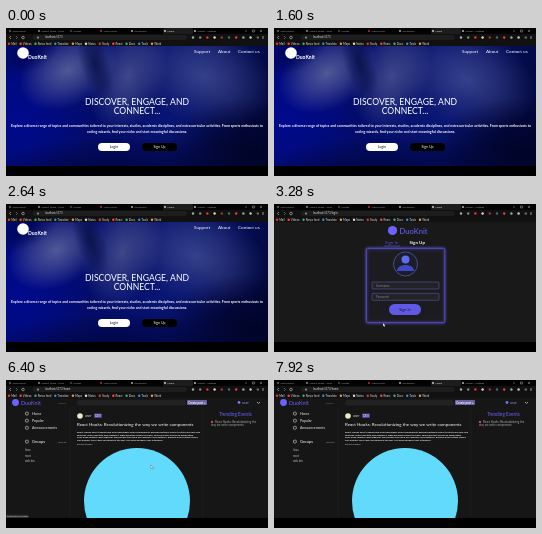
An HTML page with a canvas for the animation above (8 s loop, 262 by 148 pixels).

```html
<!DOCTYPE html>
<html lang="en">
<head>
<meta charset="utf-8">
<title>Community app tour</title>
<style>
html, body { margin: 0; width: 100%; height: 100%; overflow: hidden; background: #000; }
canvas { display: block; width: 262px; height: 148px; }
</style>
</head>
<body>
<canvas id="stage" width="262" height="148"></canvas>
<script>
const c = document.getElementById('stage').getContext('2d');
const LOOP = 8000, LOGIN = 3120, FILL = 3920, FEED = 5200;
const BRAND = 'DuoKnit', VIOLET = '#6c63ff';

function paint(fill, stroke, line) {
  if (fill) { c.fillStyle = fill; c.fill(); }
  if (stroke) { c.strokeStyle = stroke; c.lineWidth = line; c.stroke(); }
}
function box(x, y, w, h, fill, r = 0, stroke, line = .5) {
  c.beginPath();
  c.roundRect(x, y, w, h, r);
  paint(fill, stroke, line);
}
function dot(x, y, r, fill, stroke, line = .5) {
  c.beginPath();
  c.arc(x, y, r, 0, 7);
  paint(fill, stroke, line);
}
function line(color, width, ...pts) {
  c.beginPath();
  for (let i = 0; i < pts.length; i += 2) c.lineTo(pts[i], pts[i + 1]);
  paint(null, color, width);
}
function text(s, x, y, size, fill = '#fff', weight = 400, align = 'left') {
  c.font = `${weight} ${size}px Lato, sans-serif`;
  c.textAlign = align;
  c.fillStyle = fill;
  c.fillText(s, x, y);
}
// soft, optionally tilted ellipse
function glow(x, y, rx, ry, rgb, alpha, tilt = 0) {
  c.save();
  c.translate(x, y);
  c.rotate(tilt);
  c.scale(rx, ry);
  const g = c.createRadialGradient(0, 0, 0, 0, 0, 1);
  g.addColorStop(0, `rgba(${rgb},${alpha})`);
  g.addColorStop(.5, `rgba(${rgb},${alpha * .55})`);
  g.addColorStop(1, `rgba(${rgb},0)`);
  c.fillStyle = g;
  c.fillRect(-1, -1, 2, 2);
  c.restore();
}
function clip(x, y, w, h, paintInside) {
  c.save();
  c.beginPath();
  c.rect(x, y, w, h);
  c.clip();
  paintInside();
  c.restore();
}

function chrome(t) {
  box(0, 0, 262, 6, '#030303');
  box(157, 0, 30, 6, '#1d1d1d', 1.5);
  const tabs = ['Web project', 'Project board - tasks', 'Design', 'Video player', 'Dashboard', 'Home', 'Deploy - settings'];
  [4, 33, 65, 95, 126, 159, 189].forEach((x, i) => {
    dot(x, 3, .9, ['#777', '#999', '#456', '#d33', '#bbb', '#ddd', '#ccc'][i]);
    text(tabs[i], x + 2.5, 3.8, 2.5, i === 5 ? '#eee' : '#999');
  });
  line('#ccc', .4, 239, 3, 241, 3);
  box(246.5, 2, 2, 2, null, 0, '#ccc', .4);
  line('#ccc', .4, 254, 2, 256, 4);
  line('#ccc', .4, 256, 2, 254, 4);

  box(0, 6, 262, 12, '#111');
  line('#ccc', .6, 5, 8, 3.5, 9.5, 5, 11);
  line('#888', .6, 10, 8, 11.5, 9.5, 10, 11);
  dot(17, 9.5, 1.3, null, '#ccc', .6);
  box(27, 7, 154, 5, '#1d1d1d', 2.5);
  dot(32, 9.5, 1, '#999');
  const path = t < LOGIN ? '' : t < FEED ? '/login' : '/home';
  text('localhost:5173' + path, 39, 10.4, 2.7, '#ddd');
  ['#aaa', '#888', '#e33', '#ddd', '#a33', '#468', '#d44', '#9a9', '#ccc', '#666'].forEach((k, i) =>
    dot(187 + i * 7.2, 9.5, 1.2, k));
  line('#ccc', .7, 257, 8, 257, 11);

  const marks = ['Mail', 'Videos', 'News feed', 'Translate', 'Maps', 'Notes', 'Study', 'React', 'Docs', 'Tools', 'Work'];
  let x = 2;
  marks.forEach((s, i) => {
    dot(x + 1, 15.7, 1.2, ['#e33', '#f44', '#4a8', '#48d', '#e94', '#ddd'][i % 6]);
    text(s, x + 3.2, 16.7, 2.9, '#ddd');
    x += c.measureText(s).width + 6.2;
  });
  box(0, 138, 262, 10, '#000');
}

function backdrop(t) {
  const p = t / LOGIN, sway = Math.sin(p * Math.PI / 2);
  const g = c.createLinearGradient(0, 40, 262, 120);
  ['#000a78', '#030c6a', '#050f66', '#030839'].forEach((k, i) => g.addColorStop(i / 3, k));
  c.fillStyle = g;
  c.fillRect(0, 18, 262, 120);
  glow(12, 92, 75, 62, '0,10,150', .75);
  glow(198 - 8 * sway, 48 + 4 * sway, 72, 50, '85,98,165', .6, .35);
  glow(122 - 6 * sway, 48, 38, 58, '100,110,160', .6, .3);
  glow(62 - 12 * sway, 42 + 4 * sway, 52, 36, '110,118,165', .72, -.5);
  glow(89 - 5 * sway, 36, 15, 40, '2,8,60', .7, -.3);
  glow(22 - 4 * sway, 24, 36, 20, '0,4,70', .65, -.4);
  glow(165 - 8 * sway, 92, 75, 32, '15,32,135', .4);
  glow(245, 125, 90, 55, '0,2,35', .8);
  glow(110, 146, 130, 38, '0,2,50', .7);
}

function landing(t) {
  clip(0, 18, 262, 120, () => backdrop(t));
  dot(17, 25, 5.8, '#fff');
  text(BRAND, 22, 30.8, 5, '#fff', 700);
  text('Support', 188, 25, 4.6);
  text('About', 212, 25, 4.6);
  text('Contact us', 232, 25, 4.6);
  text('DISCOVER, ENGAGE, AND', 131, 76.5, 8.6, '#fff', 400, 'center');
  text('CONNECT...', 131, 86, 8.6, '#fff', 400, 'center');
  text('Explore a diverse range of topics and communities tailored to your interests, studies, academic disciplines, and extracurricular activities. From sports enthusiasts to',
    131, 99.3, 3.5, '#fff', 700, 'center');
  text('coding wizards, find your niche and start meaningful discussions.', 131, 104.8, 3.5, '#fff', 700, 'center');
  box(92, 115, 32, 8, '#fff', 4);
  text('Login', 108, 120.2, 3.5, '#111', 400, 'center');
  box(136, 115, 35, 8, '#000', 4);
  text('Sign Up', 153.5, 120.2, 3.5, '#fff', 400, 'center');
}

function login(t) {
  box(0, 18, 262, 120, '#191919');
  dot(118.5, 26.5, 4.6, VIOLET);
  text(BRAND, 125.5, 29.5, 7.6, VIOLET);
  text('Sign In', 111, 40, 4.5, '#5951c8');
  text('Sign Up', 135.5, 40, 4.5, '#fff', 700);
  line(VIOLET, .5, 110, 42, 126, 42);
  c.save();
  c.shadowColor = VIOLET;
  c.shadowBlur = 3;
  box(92.5, 44.5, 78, 74, '#1b1b20', 1, '#514abd', .8);
  c.restore();

  dot(131.5, 60, 12, '#1c1d29', '#5a63b8', .7);
  dot(131.5, 55.5, 4, '#606bf0');
  c.beginPath();
  c.moveTo(123, 67);
  c.bezierCurveTo(123, 59, 140, 59, 140, 67);
  c.closePath();
  paint('#3d4ac4');

  const full = t >= FILL;
  [78, 89.3].forEach(y => box(98, y, 67, 7, full ? '#fffbd0' : '#222229', .8, '#6963b5'));
  if (full) {
    text('user', 102, 82.9, 3.6, '#111');
    for (let i = 0; i < 10; i++) dot(102 + i * 2.8, 92.8, .85, '#111');
  } else {
    text('Username', 102, 82.7, 3, '#888');
    text('Password', 102, 94, 3, '#888');
  }
  box(115, 100, 32, 11, t > 4400 ? '#746cff' : '#6059e5', 5.5);
  text('Sign In', 131, 106.8, 3.9, '#15152b', 400, 'center');
}

function feed(t) {
  box(0, 18, 262, 120, '#161616');
  line('#242424', .5, 64, 28, 64, 138);
  line('#242424', .5, 197, 28, 197, 138);
  dot(9.5, 22.5, 3.4, VIOLET);
  text(BRAND, 15, 24.6, 5.4, VIOLET);
  box(71, 20, 109, 5.5, '#222', 2.7);
  text('Search', 52, 23.7, 2.6, '#777');
  box(181, 20, 20, 5, '#66619f', 1);
  text('Create post +', 191, 23.5, 2.9, '#fff', 700, 'center');
  dot(233, 22.5, 1.4, '#7775ee');
  text('user', 236, 23.9, 3.7, '#9790ff');
  line('#ddd', .7, 251, 22, 252.5, 23.5, 254, 22);

  ['Home', 'Popular', 'Announcements'].forEach((s, i) => {
    const y = 35 + i * 7.1;
    box(19.5, y - 2.8, 2.8, 2.8, null, .7, '#ddd', .6);
    text(s, 26, y, 3.5, '#eee');
  });
  box(19.5, 60.2, 2.8, 2.8, null, .7, '#ddd', .6);
  text('Groups', 26, 63.2, 4.1);
  text('View all', 52, 63, 2.4, '#aaa');
  ['linux', 'react', 'web dev'].forEach((s, i) => text(s, 19, 71.2 + i * 5.6, 2.7, '#bbb'));

  dot(74, 36, 2.8, '#eee6cf');
  text('user', 79, 37, 3.4, '#ddd');
  box(88, 33.6, 8, 4.5, '#4b449c', .8);
  text('DEV', 92, 36.9, 2.8, '#ddd', 700, 'center');
  text('React Hooks: Revolutionizing the way we write components', 71, 46.4, 4.45);
  [
    'React Hooks have transformed how developers build components, giving functions access to state and lifecycle',
    'features. With useState and useEffect, logic becomes easier to reuse, share and test across an application.',
    'They keep related code together and remove the need for complex class patterns. Explore how custom hooks',
    'can simplify your code and improve the way you build modern user interfaces.'
  ].forEach((s, i) => text(s, 71, 53.3 + i * 2.5, 2.5, '#eee', 700));
  text('#react #hooks', 71, 65, 2.5, '#ccc');
  clip(71, 67, 119, 71, () => dot(131, 121, 53, '#61dafb'));

  text('Trending Events', 229.5, 35.7, 4.7, VIOLET, 400, 'center');
  dot(206, 42, 1.2, '#ce493f');
  text('React Hooks: Revolutionizing the', 209, 43, 2.85, '#aaa');
  text('way we write components', 205, 46.3, 2.85, '#aaa');
  if (t >= 5520 && t < 7440) {
    box(0, 134.8, 22, 3.2, '#333', .5);
    text('localhost:5173/home', 1, 137.2, 2.3, '#ccc');
  }
}

// time, x, y
const route = [
  [2720, 150, 136], [3040, 109, 119], [3600, 109, 119], [3840, 125, 82],
  [4160, 132, 94], [4640, 128, 104], [5360, 128, 104], [5840, 164, 60],
  [6320, 145, 85], [6560, 145, 85], [7120, 178, 40], [7600, 201, 34]
];
function pointer(t) {
  const i = route.findIndex(k => k[0] > t);
  if (i < 1) return;
  const [a, x, y] = route[i - 1], [b, u, v] = route[i];
  const p = (t - a) / (b - a), e = p * p * (3 - 2 * p);
  c.save();
  c.translate(x + (u - x) * e, y + (v - y) * e);
  c.beginPath();
  [[0, 0], [0, 3.5], [.9, 2.8], [1.5, 4], [2.1, 3.7], [1.5, 2.6], [2.6, 2.5]].forEach(q => c.lineTo(...q));
  c.closePath();
  paint('#fff', '#222', .3);
  c.restore();
}

function draw(now) {
  const t = Math.floor(now % LOOP / 80) * 80;
  c.clearRect(0, 0, 262, 148);
  (t < LOGIN ? landing : t < FEED ? login : feed)(t);
  chrome(t);
  pointer(t);
  requestAnimationFrame(draw);
}
requestAnimationFrame(draw);
</script>
</body>
</html>
```
